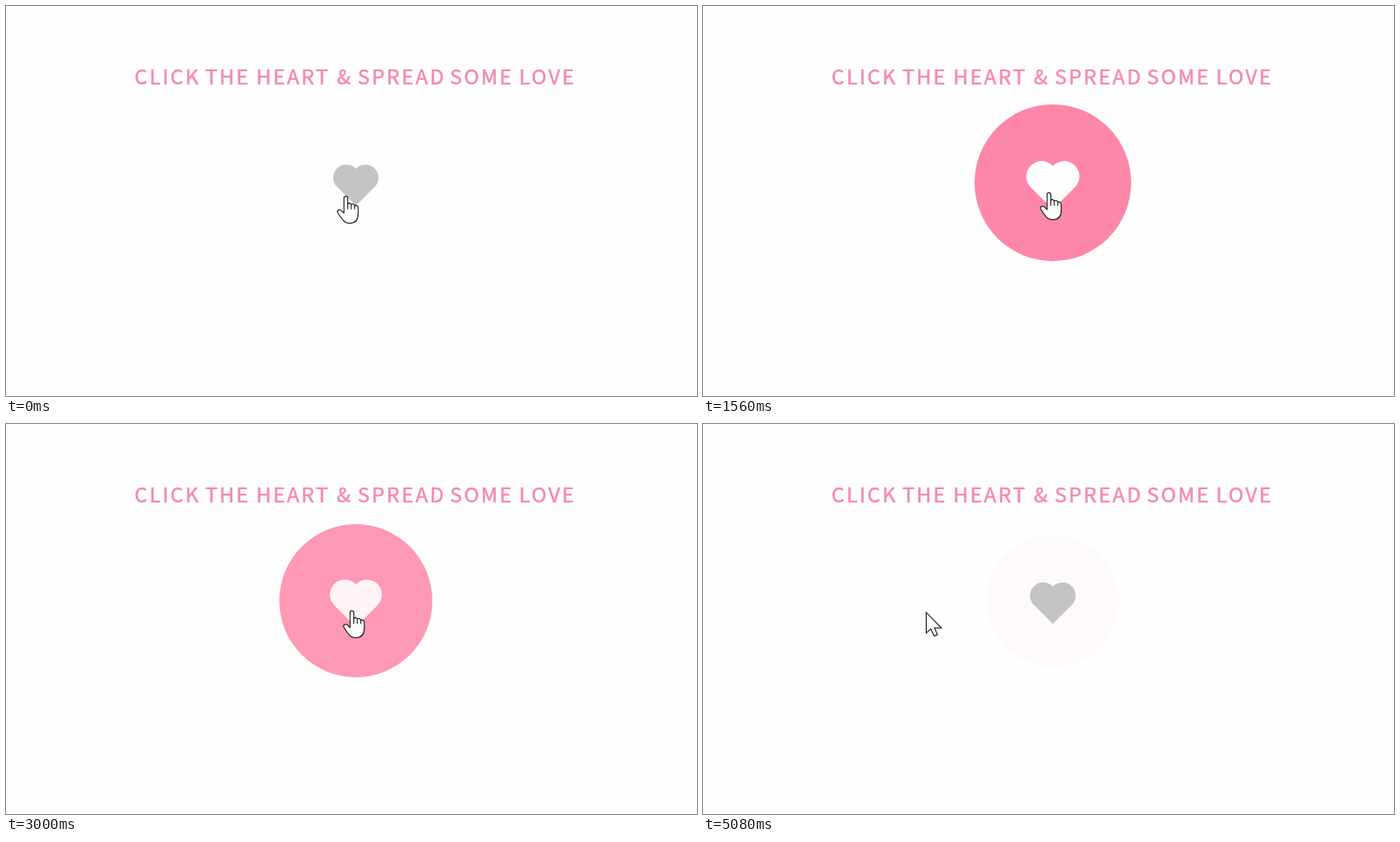
Animation of 794x448 px, one loop 5.12 s. Source, as an HTML page with a canvas:

```html
<!DOCTYPE html>
<html lang="en">
<head>
<meta charset="utf-8">
<title>Spread some love</title>
<style>
  html, body { margin: 0; width: 100%; height: 100%; overflow: hidden; background: #fefefe; }
  canvas { display: block; width: 794px; height: 448px; }
</style>
</head>
<body>
<canvas id="stage" width="794" height="448"></canvas>
<script>
const ctx = document.getElementById('stage').getContext('2d');
const LOOP = 5120, STEP = 40;
const GREY = [195, 195, 195], BLUSH = [251, 187, 206], WHITE = [254, 254, 254];

const words = [
  ['CLICK', 148.5], ['THE', 229], ['HEART', 289.5], ['&', 380],
  ['SPREAD', 405], ['SOME', 511], ['LOVE', 591.5]
];

// Each key: start time, duration, value to ease towards.
const glow = [[730, 600, 1], [1560, 2000, 0], [2680, 600, 1], [3600, 2000, 0]];
const liked = [[730, 600, 1], [1560, 250, 0], [2680, 600, 1], [3600, 250, 0]];
const hover = [[60, 320, 1], [4310, 560, 0]];
const cursorX = [[20, 500, 397.5], [4140, 500, 256.5]];
const cursorY = [[20, 500, 214.5], [4320, 350, 216.5]];

const hand = new Path2D('M-2.2 19.5V2C-2.2-.7 2.2-.7 2.2 2V8.6Q4.6 6.8 6.2 9.4Q8.8 8 10.2 10.8' +
  'Q14.2 9.8 14.2 14V20C14.2 26 11.5 31 4.5 31C-.5 31-2.8 28.6-4.5 26L-9.2 19.2' +
  'C-10.8 16.4-7.6 14.6-5.5 16.2Z');
const knuckles = new Path2D('M2.2 8V15M6.2 9V15M10.2 10.5V15');
const arrow = new Path2D('M0 0V23.6L5.2 18.9L9.2 27L13 25.5L9.4 17.8H17.4Z');

const bez = (u, a, b) => 3 * u * (1 - u) * (1 - u) * a + 3 * u * u * (1 - u) * b + u * u * u;

// cubic-bezier(.25, .1, .25, 1)
function ease(x) {
  if (x <= 0) return 0;
  if (x >= 1) return 1;
  let lo = 0, hi = 1;
  for (let i = 0; i < 24; i++) {
    const mid = (lo + hi) / 2;
    if (bez(mid, .25, .25) < x) lo = mid; else hi = mid;
  }
  return bez(lo, .1, 1);
}

function track(keys, t, value = 0) {
  keys.forEach(([start, length, goal], i) => {
    const end = i + 1 < keys.length ? Math.min(t, keys[i + 1][0]) : t;
    value += (goal - value) * ease((end - start) / length);
  });
  return value;
}

const mix = (a, b, k) => a.map((v, i) => v + (b[i] - v) * k);
const rgb = c => `rgb(${c.map(Math.round).join(',')})`;

function drawTitle() {
  ctx.font = '23.5px "Noto Sans CJK JP", "Noto Sans CJK SC", "Noto Sans CJK", Lato, sans-serif';
  ctx.letterSpacing = '2.2px';
  ctx.textBaseline = 'alphabetic';
  ctx.fillStyle = ctx.strokeStyle = '#f58aa9';
  ctx.lineWidth = 0.5;
  ctx.lineJoin = 'round';
  for (const [word, x] of words) {
    const left = x + ctx.measureText(word).actualBoundingBoxLeft;
    ctx.fillText(word, left, 90);
    ctx.strokeText(word, left, 90);
  }
}

function drawCircle(p) {
  ctx.fillStyle = `rgba(253,135,169,${p})`;
  ctx.beginPath();
  ctx.arc(402, 203, 75.3 + 14.7 * p, 0, Math.PI * 2);
  ctx.fill();
}

function drawHeart(scale, color) {
  ctx.save();
  ctx.translate(402, 205.5);
  ctx.scale(scale, scale);
  ctx.fillStyle = color;
  const notch = Math.atan2(10.2, 11);
  ctx.beginPath();
  ctx.moveTo(0, 23.9);
  ctx.arc(-11, -8.3, 15, Math.PI * 0.75, -notch);
  ctx.arc(11, -8.3, 15, Math.PI + notch, Math.PI * 0.25);
  ctx.closePath();
  ctx.fill();
  ctx.restore();
}

function drawCursor(x, y) {
  const pointing = x > 330;
  const shape = pointing ? hand : arrow;
  ctx.save();
  ctx.translate(x, y);
  ctx.fillStyle = '#fff';
  ctx.strokeStyle = '#111';
  ctx.lineWidth = 1.05;
  ctx.lineJoin = pointing ? 'round' : 'miter';
  ctx.fill(shape);
  ctx.stroke(shape);
  if (pointing) ctx.stroke(knuckles);
  ctx.restore();
}

function draw(t) {
  ctx.fillStyle = '#fefefe';
  ctx.fillRect(0, 0, 794, 448);
  drawTitle();
  const p = track(glow, t);
  const base = mix(GREY, BLUSH, track(hover, t));
  drawCircle(p);
  drawHeart(1 + 0.175 * p, rgb(mix(base, WHITE, track(liked, t))));
  drawCursor(track(cursorX, t, 390.5), track(cursorY, t, 218.5));
}

const begin = performance.now();
function frame() {
  const t = (performance.now() - begin) % LOOP;
  draw(Math.floor(t / STEP) * STEP);
  requestAnimationFrame(frame);
}
frame();
</script>
</body>
</html>
```
